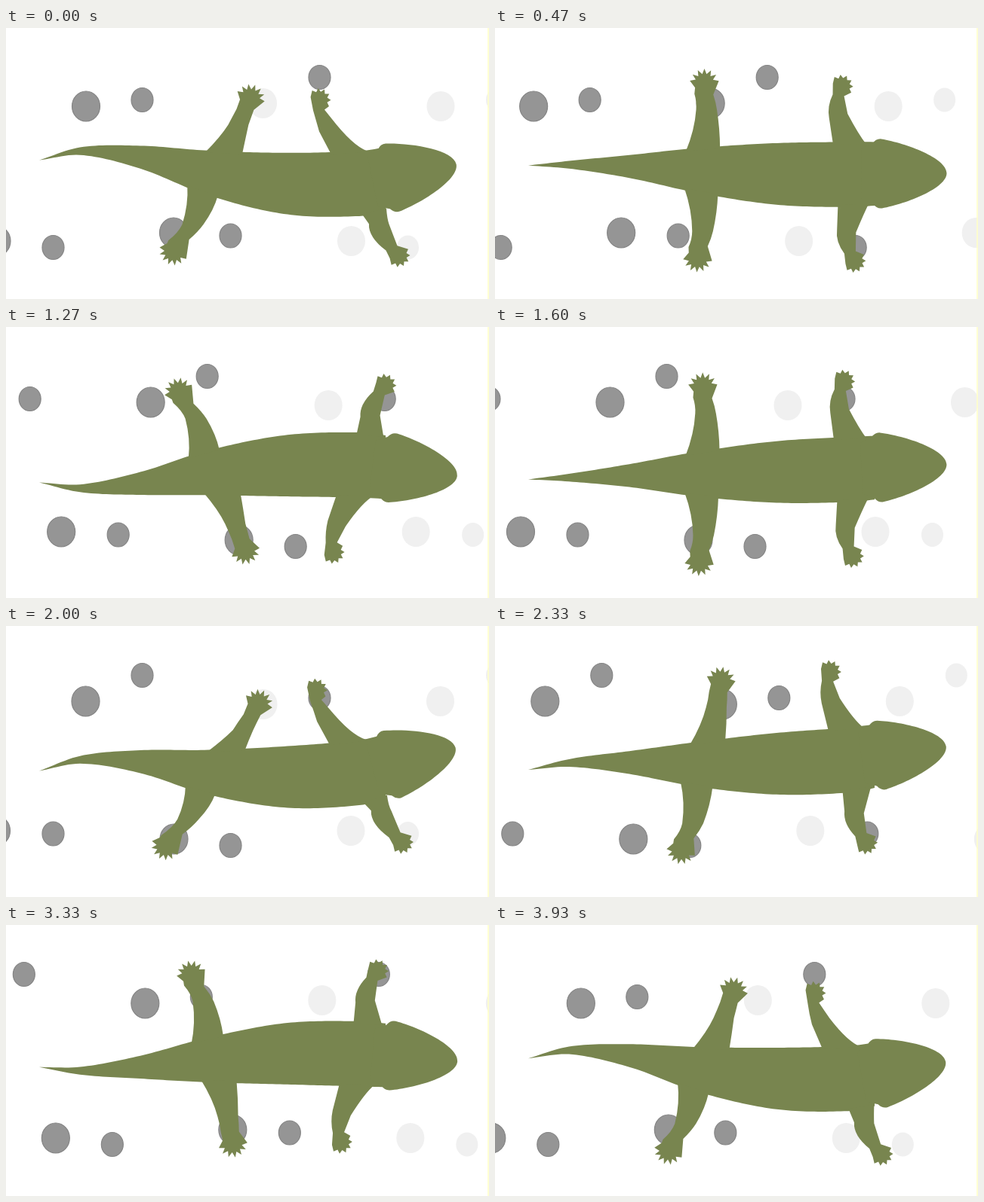
Animation, 640 px wide and 360 px high, one loop 4 s. Source, as an HTML page with a canvas:

```html
<!DOCTYPE html>
<html lang="en">
<head>
<meta charset="utf-8">
<title>Walking lizard</title>
<style>
  html, body { margin: 0; width: 100%; height: 100%; overflow: hidden; background: #fff; }
  canvas { display: block; }
</style>
</head>
<body>
<canvas id="stage" width="640" height="360"></canvas>
<script>
const ctx = document.getElementById('stage').getContext('2d');
const SKIN = '#78854f';
const LOOP = 4, FRAMES = 60, STRIDE = 470;

const lerp = (a, b, u) => a + (b - a) * u;

// Smooth curve through points with uneven spacing
function curve(xs, ys, x) {
  const last = xs.length - 1;
  let i = 0;
  while (i < last - 1 && x > xs[i + 1]) i++;
  const slope = k => {
    const a = Math.max(0, k - 1), b = Math.min(last, k + 1);
    return (ys[b] - ys[a]) / (xs[b] - xs[a]);
  };
  const h = xs[i + 1] - xs[i], u = (x - xs[i]) / h;
  const u2 = u * u, u3 = u2 * u;
  return ys[i] * (2 * u3 - 3 * u2 + 1) + ys[i + 1] * (3 * u2 - 2 * u3) +
    h * (slope(i) * (u3 - 2 * u2 + u) + slope(i + 1) * (u3 - u2));
}

// Every quantity is a steady swing (one per step) plus a slow drift over the loop
const TIMES = [-1.333, -0.667, 0, 0.467, 1.267, 2, 2.667, 3.333, 4, 4.467];
const drift = (k, t) => curve(TIMES, [k[4], k[5], ...k, k[0], k[1]], t);
const swing = t => { const p = t % 2; return p < 1 ? 2 * p - 1 : 3 - 2 * p; };
const value = (m, t) => m.swing * swing(t) + drift(m.drift, t);

const KNOTS = [44, 100, 180, 265, 370, 470, 510];
const HALF = [0, 5.3, 15.5, 29.3, 40.7, 43.3, 42];
const SPINE = [
  { swing: 13, drift: [188.5, 183.5, 200.5, 205.5, 184.5, 184.5] },
  { swing: 20, drift: [183.5, 183, 205, 197.5, 181, 187] },
  { swing: 14, drift: [186, 185, 201, 194.5, 179, 184] },
  { swing: 0, drift: [192, 189, 194, 194, 174, 179.5] },
  { swing: -11, drift: [195.5, 193, 189.5, 189.5, 169.7, 174.7] },
  { swing: -10, drift: [196.5, 194, 188, 184.5, 166, 174.5] },
  { swing: -6, drift: [193, 193, 189.8, 178, 164, 175.5] }
];
const TILT = { swing: 12, drift: [0.2, 0.3, 1.5, -3, -3.3, 1] };
const FRONT_REACH = { swing: 55, drift: [2.5, -4.7, 8.7, -2, -6.7, 5.8] };
const REAR_REACH = { swing: -55, drift: [-4.5, 0.7, -18, 6, 5, -9] };

// Footprints: rear feet leave big ones, front feet small ones
const PRINTS = [
  [340.5, 100, 1], [576, 104, 1], [222, 272, 1], [457.5, 283, 1],
  [415.5, 65.5, 0], [650.5, 95.5, 0], [297.5, 276, 0], [532.5, 291.5, 0]
];

function drawPrints(t) {
  for (const [x0, y, big] of PRINTS) {
    for (let n = -1; n <= 2; n++) {
      const x = x0 + n * STRIDE - STRIDE * t / LOOP;
      if (x < -30 || x > 670) continue;
      const pressed = x < (big ? 339.5 : 531);
      ctx.beginPath();
      ctx.ellipse(x, y, big ? 18.5 : 14.5, big ? 20 : 16, 0, 0, 2 * Math.PI);
      ctx.fillStyle = pressed ? '#959595' : '#f0f0f0';
      ctx.fill();
      if (pressed) {
        ctx.strokeStyle = '#858585';
        ctx.lineWidth = 1.2;
        ctx.stroke();
      }
    }
  }
}

// side: -1 is the upper limb, 1 the lower; offsets are given from the foot
function drawLimb(x, y, side, limb, edge) {
  const at = (dx, dy) => [x + dx, y - side * dy];
  const root = bx => [bx, edge(bx, side) - side * 3];
  const polar = (deg, r) => {
    const a = deg * Math.PI / 180;
    return at(r * Math.sin(a), -r * Math.cos(a));
  };
  const bulge = (p, q, [dx, dy]) => {
    ctx.quadraticCurveTo((p[0] + q[0]) / 2 + dx, (p[1] + q[1]) / 2 - side * dy, ...q);
  };
  const { left, right } = limb;
  const rootL = root(left.root), rootR = root(right.root);
  const jointL = at(...left.joint), jointR = at(...right.joint);
  const wristL = at(...left.wrist), wristR = at(...right.wrist);
  ctx.beginPath();
  ctx.moveTo(...rootL);
  bulge(rootL, jointL, left.thigh);
  bulge(jointL, wristL, left.shin);
  ctx.lineTo(...polar(limb.aim - limb.spread - 35, limb.palm + 1));
  const steps = 2 * (limb.claws - 1);
  for (let i = 0; i <= steps; i++) {
    const deg = limb.aim + limb.spread * (2 * i / steps - 1);
    ctx.lineTo(...polar(deg, i % 2 ? limb.palm : limb.tip));
  }
  ctx.lineTo(...wristR);
  bulge(wristR, jointR, right.shin);
  bulge(jointR, rootR, right.thigh);
  ctx.closePath();
  ctx.fill();
}

function frontLimb(x) {
  const u = (x - 415) / 86, v = 1 - u;
  return {
    left: {
      root: 431 + 0.385 * (x - 415), joint: [lerp(0, -32, u), 42],
      wrist: [lerp(-8, -15, u), lerp(14, 8, u)], thigh: [0, 0], shin: [-10 * u, 0]
    },
    right: {
      root: 483 + 0.2 * (x - 415), joint: [lerp(23, -6, u), lerp(33, 40, u)],
      wrist: [lerp(7, 0, u), 13], thigh: [4 * v, -14 * v * -1], shin: [0, 0]
    },
    aim: 43, spread: 80, claws: 6, palm: 11, tip: 15.5
  };
}

function rearLimb(x) {
  const u = (x - 230) / 93, v = 1 - u;
  return {
    left: {
      root: 242 + 0.23 * (x - 230), joint: [lerp(8, -29, u), 35],
      wrist: [lerp(-8, -18, u), 14], thigh: [5, -2 * u], shin: [4 * v, 0]
    },
    right: {
      root: 283 + 0.32 * (x - 230), joint: [lerp(36, -2, u), 35],
      wrist: [lerp(19, 5, u), 15], thigh: [4 * v, 0], shin: [2 * v, 0]
    },
    aim: lerp(-20, 20, u), spread: 80, claws: 7, palm: 12.5, tip: 19.5
  };
}

function drawBody(edge) {
  ctx.beginPath();
  ctx.moveTo(44, edge(44, -1));
  for (let x = 48; x <= 503; x += 5) ctx.lineTo(x, edge(x, -1));
  for (let x = 503; x >= 44; x -= 5) ctx.lineTo(x, edge(x, 1));
  ctx.closePath();
  ctx.fill();
}

function drawHead(y, tilt) {
  ctx.save();
  ctx.translate(510.5, y);
  ctx.rotate(tilt * Math.PI / 180);
  ctx.beginPath();
  ctx.moveTo(-25, -34);
  ctx.lineTo(-10, -40);
  ctx.quadraticCurveTo(-5, -47, 2, -46);
  ctx.bezierCurveTo(35, -40, 88, -20, 88, 0);
  ctx.bezierCurveTo(88, 20, 35, 40, 2, 46);
  ctx.quadraticCurveTo(-5, 47, -10, 40);
  ctx.lineTo(-25, 34);
  ctx.closePath();
  ctx.fill();
  ctx.restore();
}

function draw(t) {
  ctx.fillStyle = '#fff';
  ctx.fillRect(0, 0, 640, 360);
  drawPrints(t);
  ctx.fillStyle = 'rgba(255, 255, 200, 0.8)';
  ctx.fillRect(638, 0, 2, 360);

  const ys = SPINE.map(m => value(m, t));
  const edge = (x, side) => curve(KNOTS, ys, x) + side * curve(KNOTS, HALF, x);
  ctx.fillStyle = SKIN;
  drawBody(edge);
  drawHead(ys[6], value(TILT, t));

  const front = value(FRONT_REACH, t), rear = value(REAR_REACH, t);
  for (const side of [-1, 1]) {
    const fx = 467.5 - side * front, rx = 273 - side * rear;
    const fy = ys[5] + side * (117.5 - 0.0047 * (fx - 452) ** 2);
    const ry = ys[3] + side * (116 - 0.0058 * (rx - 268) ** 2);
    drawLimb(fx, fy, side, frontLimb(fx), edge);
    drawLimb(rx, ry, side, rearLimb(rx), edge);
  }
}

const start = performance.now();
function tick() {
  const s = (performance.now() - start) / 1000;
  const frame = Math.floor(s * FRAMES / LOOP + 0.1) % FRAMES;
  draw(frame * LOOP / FRAMES);
  requestAnimationFrame(tick);
}
tick();
</script>
</body>
</html>
```
